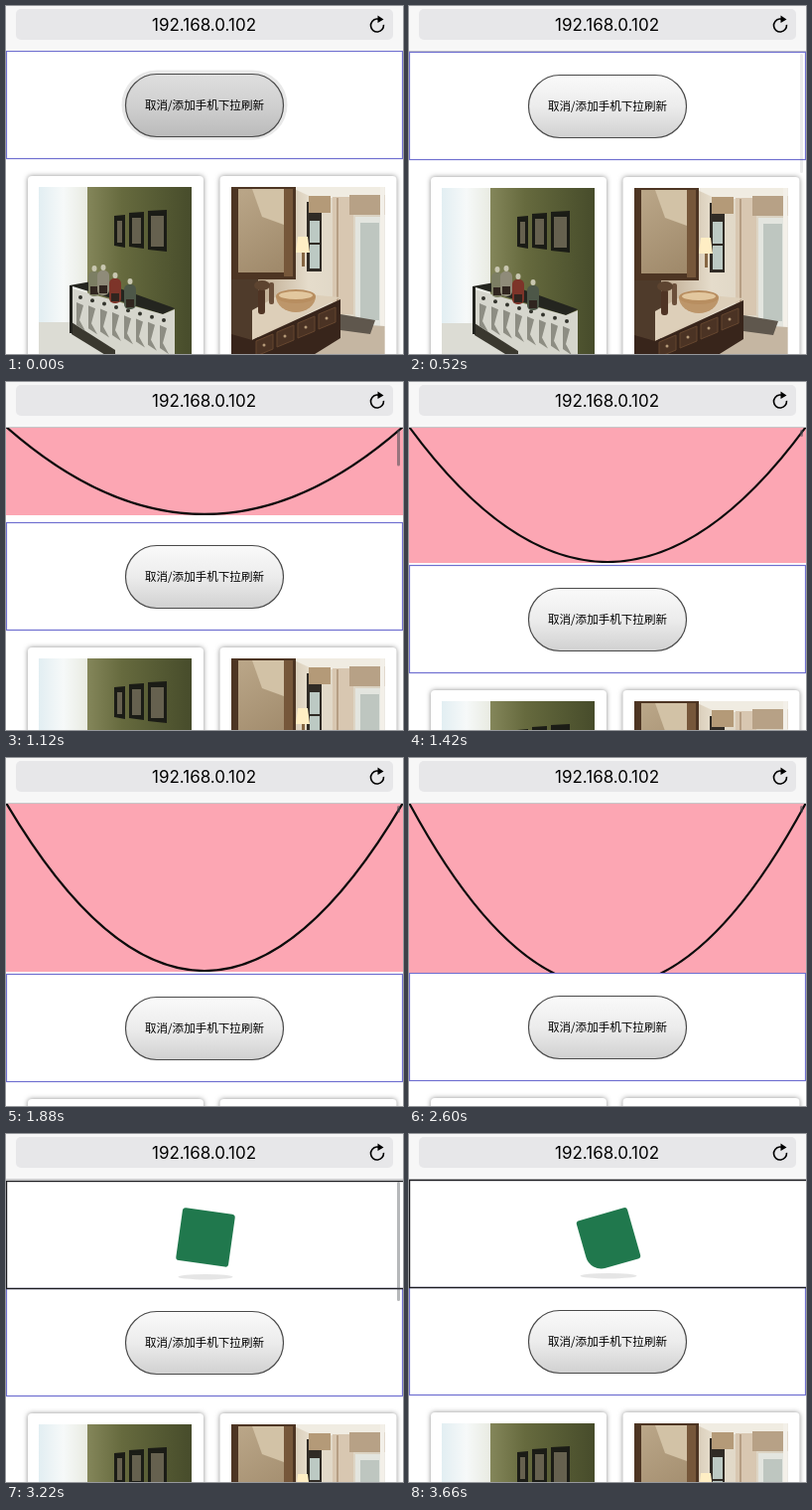
Write an HTML page with a canvas that moves like this. It is 400 px wide and 350 px high and loops after 3.68 s.

```html
<!DOCTYPE html>
<html lang="zh">
<head>
<meta charset="utf-8">
<style>
html, body { margin: 0; width: 400px; height: 350px; overflow: hidden; background: #fff; }
canvas { display: block; }
</style>
</head>
<body>
<canvas id="stage" width="400" height="350"></canvas>
<script>
const ctx = document.getElementById('stage').getContext('2d');
const LOOP = 3680, BAR = 46, PANEL = 109, RELEASE = 2680, SPIN = 600;
const PULL = [[480, 0], [860, 53], [1420, 139], [1880, 172], [2600, 171]];
const DEPTH = [[560, 0], [860, 40], [1420, 136], [1880, 169], [2600, 185]];

const lerp = (a, b, k) => a + (b - a) * k;

// Smooth monotone curve through [time, value] points.
function track(points, t) {
  const n = points.length - 1;
  if (t <= points[0][0]) return points[0][1];
  if (t >= points[n][0]) return points[n][1];
  const rate = i => (points[i + 1][1] - points[i][1]) / (points[i + 1][0] - points[i][0]);
  const tangent = i => {
    if (i === 0 || i === n) return 0;
    const a = rate(i - 1), b = rate(i);
    return a * b <= 0 ? 0 : 2 * a * b / (a + b);
  };
  let i = 0;
  while (t > points[i + 1][0]) i++;
  const [t0, a] = points[i], [t1, b] = points[i + 1];
  const span = t1 - t0, u = (t - t0) / span, v = 1 - u;
  return a * (1 + 2 * u) * v * v + b * u * u * (3 - 2 * u)
    + span * u * v * (tangent(i) * v - tangent(i + 1) * u);
}

function box(x, y, w, h, fill) {
  ctx.fillStyle = fill;
  ctx.fillRect(x, y, w, h);
}

function poly(fill, ...p) {
  ctx.beginPath();
  for (let i = 0; i < p.length; i += 2) ctx.lineTo(p[i], p[i + 1]);
  ctx.closePath();
  ctx.fillStyle = fill;
  ctx.fill();
}

function round(x, y, w, h, r, fill) {
  ctx.beginPath();
  ctx.roundRect(x, y, w, h, r);
  ctx.fillStyle = fill;
  ctx.fill();
}

function oval(x, y, rx, ry, fill) {
  ctx.beginPath();
  ctx.ellipse(x, y, rx, ry, 0, 0, Math.PI * 2);
  ctx.fillStyle = fill;
  ctx.fill();
}

function gradient(x0, y0, x1, y1, ...colors) {
  const g = ctx.createLinearGradient(x0, y0, x1, y1);
  colors.forEach((c, i) => g.addColorStop(i / (colors.length - 1), c));
  return g;
}

function clipped(x, y, w, h, paint) {
  ctx.save();
  ctx.beginPath();
  ctx.rect(x, y, w, h);
  ctx.clip();
  paint();
  ctx.restore();
}

function livingRoom() {
  box(33, 182, 154, 175, gradient(82, 0, 187, 0, '#84865a', '#666a3e', '#565b34', '#474c2b'));
  box(33, 182, 49, 175, gradient(33, 0, 82, 0, '#e2eef2', '#f6f9f9', '#e9ebe2'));
  poly('#dcdcd4', 33, 318, 66, 318, 110, 357, 33, 357);
  [[109, 211, 11, 32], [124, 208, 15, 36], [143, 206, 19, 41]].forEach(([x, y, w, h]) => {
    poly('#1b1c16', x, y, x + w, y - 1, x + w, y + h, x, y + h - 2);
    box(x + 3, y + 5, w - 6, h - 10, '#66614f');
  });
  poly('#24251f', 64, 281, 92, 276, 170, 304, 158, 310);
  poly('#d6d6cd', 66, 284, 158, 310, 170, 305, 170, 357, 110, 357, 66, 318);
  poly('#3a382f', 66, 318, 110, 346, 110, 357, 66, 330);
  box(64, 281, 3, 48, '#22221d');
  for (let i = 0; i < 8; i++) {
    const x = 71 + i * 12, y = 289 + i * 3.3;
    poly('#8d8d83', x, y + 9, x + 7, y + 12, x + 3, y + 27, x + 9, y + 38, x, y + 32);
    oval(x + 4, y + 4, 2, 2, '#33342d');
  }
  [[89, 282, '#7c7e63'], [98, 281, '#8f8b79'], [110, 289, '#7d3429'], [125, 295, '#4d5748']].forEach(([x, y, c]) => {
    round(x - 6, y - 15, 12, 25, 5, c);
    oval(x, y - 18, 2.5, 3, '#c8c6b0');
    box(x - 4, y, 8, 8, '#30251f');
  });
}

function bathroom() {
  box(227, 182, 155, 175, gradient(227, 0, 382, 0, '#a88e6e', '#e5dccb', '#d8d0c0'));
  poly('#f0ece2', 286, 182, 382, 182, 382, 193, 310, 193);
  box(227, 182, 65, 93, '#4d3523');
  box(280, 184, 9, 88, '#76573a');
  box(234, 184, 46, 84, gradient(234, 190, 280, 262, '#b9a587', '#a08a6b'));
  poly('#d2c2a6', 248, 184, 280, 184, 280, 220, 258, 212);
  box(303, 197, 15, 70, '#302b25');
  box(306, 216, 10, 48, '#bcc9c3');
  box(306, 238, 10, 2, '#302b25');
  box(305, 191, 22, 17, '#b49a78');
  box(329, 192, 21, 118, '#d8c7b1');
  box(333, 193, 2, 116, '#b69e84');
  box(346, 190, 36, 20, '#b7a186');
  box(352, 212, 30, 112, '#e3e5df');
  box(357, 218, 19, 98, '#bec6c0');
  box(377, 182, 5, 145, '#f3f0e9');
  poly('#ffeec4', 294, 232, 304, 232, 306, 248, 292, 248);
  box(298, 248, 3, 14, '#866744');
  poly('#c5b6a2', 320, 318, 382, 322, 382, 357, 310, 357);
  box(227, 275, 27, 82, '#4f3b2b');
  poly('#ddcfb9', 248, 306, 280, 288, 337, 293, 248, 336);
  poly('#38251b', 227, 330, 248, 336, 337, 295, 337, 334, 300, 357, 227, 357);
  ctx.strokeStyle = '#65462f';
  ctx.lineWidth = 1;
  for (let i = 0; i < 4; i++) {
    const x = 252 + i * 21, y = 337 - i * 9;
    poly('#4b3324', x, y, x + 17, y - 7, x + 17, y + 8, x, y + 15);
    ctx.stroke();
    oval(x + 8, y + 4, 1.5, 1.5, '#b59a78');
  }
  ctx.beginPath();
  ctx.ellipse(292, 292, 20, 16, 0, 0, Math.PI);
  ctx.fillStyle = '#bd966a';
  ctx.fill();
  oval(292, 292, 20, 7, '#b88e60');
  oval(292, 291, 17, 4, '#e2c79e');
  round(254, 284, 7, 26, 3, '#4f3424');
  round(265, 278, 5, 22, 2, '#6b4f3a');
  oval(258, 281, 8, 5, '#5d4430');
  poly('#5f574d', 337, 310, 372, 316, 367, 330, 337, 326);
}

function card(x, w, picture) {
  ctx.save();
  ctx.shadowColor = 'rgba(0,0,0,.45)';
  ctx.shadowBlur = 5;
  round(x, 171, w, 210, 4, '#fff');
  ctx.restore();
  clipped(x + 11, 182, w - 23, 175, picture);
}

function button(pressed) {
  if (pressed) round(116.5, 64.5, 167, 70, 35, '#e8e8e8');
  ctx.beginPath();
  ctx.roundRect(120.5, 68.5, 159, 63, 31.5);
  ctx.fillStyle = pressed
    ? gradient(0, 68, 0, 132, '#dedede', '#d0d0d0', '#bababa')
    : gradient(0, 68, 0, 132, '#fafafa', '#ececec', '#d0d0d0');
  ctx.fill();
  ctx.strokeStyle = '#4a4a4a';
  ctx.lineWidth = 1.2;
  ctx.stroke();
  ctx.fillStyle = '#000';
  ctx.font = '11.55px "Noto Sans CJK SC", "Noto Sans CJK", sans-serif';
  ctx.fillText('取消/添加手机下拉刷新', 200, 104);
}

function page(offset, pressed) {
  ctx.save();
  ctx.translate(0, offset);
  ctx.strokeStyle = '#7070d0';
  ctx.lineWidth = 1.2;
  ctx.strokeRect(0.5, 45.5, 399, 108);
  button(pressed);
  card(22, 177, livingRoom);
  card(215.5, 178, bathroom);
  ctx.restore();
}

function sheet(depth, offset) {
  if (depth <= 0) return;
  const top = BAR - 1;
  clipped(0, BAR, 400, Math.min(depth, offset - 1), () => {
    box(0, BAR, 400, 304, '#fca6b3');
    ctx.beginPath();
    ctx.moveTo(0, top);
    ctx.quadraticCurveTo(200, top + 2 * depth, 400, top);
    ctx.strokeStyle = '#0c0c0c';
    ctx.lineWidth = 2.2;
    ctx.stroke();
  });
}

function loader(top, t) {
  ctx.strokeStyle = '#1c1c20';
  ctx.lineWidth = 1.4;
  ctx.strokeRect(0.5, top + 0.5, 402, 108);

  const phase = (((t - 3660) / SPIN + 0.821) % 1 + 1) % 1;
  const drop = 1 - Math.abs(2 * phase - 1);
  const squash = 1 - 0.1 * Math.max(0, 2 * drop - 1);
  const sharp = phase < 0.17 ? 1 : phase < 0.5 ? (0.5 - phase) / 0.33 : 2 * phase - 1;
  const side = 53.3, small = 3.2;

  oval(201, top + 96.7, side / 2 * (1 + 0.2 * drop), 2.7, '#e5e5e5');
  ctx.save();
  ctx.translate(201, top + 53.5 + 19.2 * drop);
  ctx.scale(1, squash);
  ctx.rotate(phase * Math.PI / 2);
  round(-side / 2, -side / 2, side, side, [small, small, lerp(39.5, small, sharp), small], '#20784d');
  ctx.restore();
}

function scrollbar(offset, t) {
  const over = t < RELEASE ? offset : offset - PANEL;
  const fade = t < RELEASE ? Math.min(1, over / 5) : Math.max(0, Math.min(1, (3400 - t) / 250));
  if (fade <= 0) return;
  ctx.globalAlpha = fade;
  round(394, 48, 3, Math.max(7, 121 - over * 0.88), 1.5, 'rgba(70,75,80,.55)');
  ctx.globalAlpha = 1;
}

function addressBar() {
  box(0, 0, 400, BAR - 1, '#f7f7f7');
  round(10, 3, 380, 31, 5, '#e7e7e9');
  ctx.fillStyle = '#000';
  ctx.font = '17px Inter, sans-serif';
  ctx.fillText('192.168.0.102', 199.5, 25);
  ctx.beginPath();
  ctx.arc(374, 19.5, 6.5, -0.1, -1.1, false);
  ctx.strokeStyle = '#000';
  ctx.lineWidth = 1.6;
  ctx.stroke();
  poly('#000', 374.5, 9.5, 380.5, 13.5, 374.5, 17);
}

function draw(t) {
  const pulling = t < RELEASE;
  const offset = Math.round(pulling
    ? track(PULL, t)
    : PANEL + 62 * Math.exp((RELEASE - t) / 122));
  box(0, 0, 400, 350, '#fff');
  box(0, BAR - 1, 400, 1, '#c6c6c8');
  ctx.textAlign = 'center';
  page(offset, t < 200);
  if (pulling) sheet(Math.round(track(DEPTH, t)), offset);
  else loader(BAR + offset - PANEL, t);
  scrollbar(offset, t);
  addressBar();
}

const start = performance.now();
function tick() {
  draw((performance.now() - start) % LOOP);
  requestAnimationFrame(tick);
}
tick();
</script>
</body>
</html>
```
